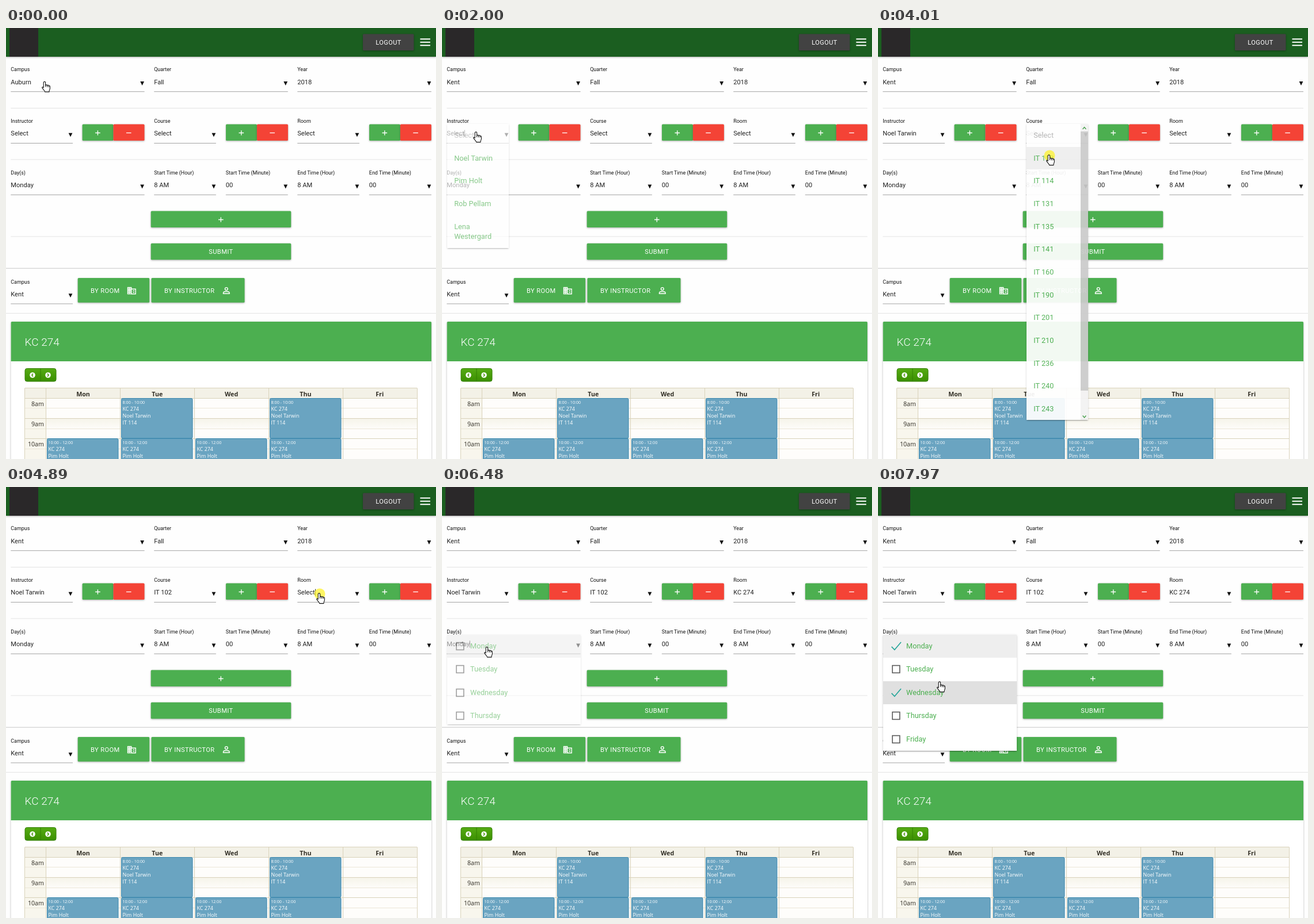
An HTML page that plays this animation: 747 px wide and 750 px high, repeating every 8000 ms.

```html
<!DOCTYPE html>
<html lang="en">
<head>
<meta charset="utf-8">
<title>Class schedule form</title>
<style>
html, body { margin: 0; width: 100%; height: 100%; overflow: hidden; background: #fefefe; }
body { position: relative; font-family: Roboto, sans-serif; }
svg { position: absolute; left: 0; top: 0; display: block; }
.btn { filter: drop-shadow(0 1.4px 1.6px rgba(0,0,0,.32)); }
.cal { font-family: "Open Sans", "Noto Sans", sans-serif; }
.list { position: absolute; overflow: hidden; background: #fff;
  box-shadow: 0 1.6px 1.6px rgba(0,0,0,.14), 0 1px 4px rgba(0,0,0,.14), 0 2.4px 1px -1.6px rgba(0,0,0,.2); }
.row { box-sizing: border-box; position: relative; padding: 11.1px 12.7px; white-space: pre;
  font-size: 12.69px; line-height: 17.45px; color: #4caf50; }
.bar { position: absolute; right: 0; top: 0; }
</style>
</head>
<body>
<svg id="page" width="747" height="750" viewBox="0 0 747 750"></svg>
<div id="lists"></div>
<svg id="top" width="747" height="750" viewBox="0 0 747 750">
  <circle id="spot" r="9.5" fill="#fdf22f" opacity=".75"/>
  <path id="hand" fill="#fff" stroke="#111" stroke-width="1.1" stroke-linejoin="round"
    d="M-1.8 1.6a1.7 1.7 0 0 1 3.4 0V6.4a1.5 1.5 0 0 1 2.9.3a1.4 1.4 0 0 1 2.7.5a1.3 1.3 0 0 1 2.2.8V11.5c0 2.2-1.4 3-1.4 5V17.6H.6c0-2.2-3.5-4.3-4.8-7c-.5-1.3 1-2.1 2.4-.2zM1.6 6.2V9M4.5 6.8V9.3M7.2 7.4V9.6"/>
</svg>
<script>
const GREEN = '#4caf50', RED = '#f44336', LOOP = 8000;
const $ = id => document.getElementById(id);
const rect = (x, y, w, h, fill, more = '') =>
  `<rect x="${x}" y="${y}" width="${w}" height="${h}" fill="${fill}" ${more}/>`;
const text = (x, y, s, size = 11.1, fill = '#222', more = '') =>
  `<text x="${x}" y="${y}" font-size="${size}" fill="${fill}" ${more}>${s}</text>`;
const path = (d, stroke, width = 1, more = '') =>
  `<path d="${d}" fill="none" stroke="${stroke}" stroke-width="${width}" ${more}/>`;
const mid = 'text-anchor="middle"';
const caps = 'letter-spacing=".4"';
const button = (x, y, w, h, fill) => rect(x, y, w, h, fill, 'rx="1.6" class="btn"');
const sign = (x, y, plus) =>
  path(`M${x - 4.3} ${y}h8.6${plus ? `M${x} ${y - 4.3}v8.6` : ''}`, '#fff', 1.3);

// x, width, label baseline, label, value
const fields = [
  [8.3, 232.3, 75.3, 'Campus', 'Auburn'],
  [8.3, 107.7, 165, 'Instructor', 'Select'],
  [257.2, 107.7, 165, 'Course', 'Select'],
  [506.2, 107.7, 165, 'Room', 'Select'],
  [8.3, 232.3, 254.8, 'Day(s)', 'Monday'],
  [257.2, 232.5, 75.3, 'Quarter', 'Fall'],
  [506.2, 232.8, 75.3, 'Year', '2018'],
  [257.2, 107.7, 254.8, 'Start Time (Hour)', '8 AM'],
  [381.8, 107.9, 254.8, 'Start Time (Minute)', '00'],
  [506.2, 107.7, 254.8, 'End Time (Hour)', '8 AM'],
  [630.8, 108.2, 254.8, 'End Time (Minute)', '00'],
  [8.3, 107.7, 444.5, 'Campus', 'Kent']
];

function field([x, w, y, label, value]) {
  const r = x + w;
  return text(x, y, label, 8.95, '#111') + text(x, y + 22.4, value, 11.1, '#222', 'class="value"') +
    rect(x, y + 35, w, 0.9, '#999') +
    `<path d="M${r - 7.4} ${y + 17.8}h6.8l-3.4 6.8z" fill="#111"/>`;
}

function calendarEvent(x, y, h, lines) {
  return rect(x, y, 123.5, h, '#6aa4c1', 'rx="2" stroke="#3a87ad"') +
    lines.map((s, i) => text(x + 2, y + (i ? 9.2 + 12.2 * i : 9.2), s, i ? 8.9 : 7.2, '#fff')).join('');
}

function calendar() {
  const cols = [69.5, 198.5, 327.5, 456.5, 585.5, 714.5];
  let s = rect(33, 627, 681.5, 123, '#fefdfb') + rect(33, 627, 36.5, 123, '#f8f6ed') +
    rect(33, 627, 681.5, 17, '#f3f1e7') + rect(70, 680, 644, 17, 'url(#cream)');
  s += path('M33 661.5H714M33 697.5H714M33 732.5H714', '#ece7d8', 1);
  s += path('M32.5 627V750' + cols.map(x => `M${x} 627V750`).join('') +
    'M32.5 626.5H714.5M32.5 644.5H714.5M32.5 679.5H714.5M32.5 714.5H714.5', '#d9d2ba');
  ['Mon', 'Tue', 'Wed', 'Thu', 'Fri'].forEach((d, i) =>
    s += text(134 + 128.8 * i, 640.5, d, 10.7, '#312e25', mid + ' font-weight="700"'));
  ['8am', '9am', '10am'].forEach((h, i) =>
    s += text(66, 658 + 35 * i, h, 10.7, '#312e25', 'text-anchor="end"'));
  [200.5, 458.5].forEach(x => s += calendarEvent(x, 644.5, 69.5, ['8:00 - 10:00', 'KC 274', 'Noel Tarwin', 'IT 114']));
  [71.5, 200.5, 329.5, 458.5].forEach(x => s += calendarEvent(x, 714.5, 70, ['10:00 - 12:00', 'KC 274', 'Pim Holt']));
  return `<g class="cal">${s}</g>`;
}

function arrowButton(x, dir) {
  return `<circle cx="${x}" cy="604" r="4.8" fill="#fff"/>` +
    path(`M${x + dir} 601.6l${-2 * dir} 2.4l${2 * dir} 2.4`, '#3f9400', 1.5);
}

function drawPage() {
  let s = `<defs>
    <linearGradient id="cream" x2="0" y2="1"><stop stop-color="#f6f4ea"/><stop offset="1" stop-color="#fdfcf9"/></linearGradient>
    <linearGradient id="nav" x2="0" y2="1"><stop stop-color="#55ab14"/><stop offset="1" stop-color="#3b8f00"/></linearGradient>
  </defs>`;
  s += rect(0, 0, 747, 50, '#1b5e20', 'class="btn"') + rect(6, 0, 50, 50, '#2a2829');
  s += button(620, 10.5, 88.5, 28.5, '#424242') + text(664.5, 28.7, 'LOGOUT', 11.1, '#fff', mid + ' ' + caps);
  s += path('M719.5 19.2h17.5M719.5 24.7h17.5M719.5 30.2h17.5', '#fff', 2);
  [139, 228.5, 362.5].forEach(y => s += rect(8.3, y, 730.7, 0.9, '#e0e0e0'));
  s += rect(0, 417.6, 747, 1.2, '#cfcfcf') + rect(0, 496, 747, 1, '#e4e4e4');
  s += fields.map(field).join('');
  [132.6, 382, 631].forEach(x => {
    s += button(x, 167.6, 53.9, 28.5, GREEN) + button(x + 53.9, 167.6, 54, 28.5, RED);
    s += sign(x + 26.8, 182.5, true) + sign(x + 80.6, 182.5, false);
  });
  s += button(251.7, 318.5, 243.5, 28.5, GREEN) + sign(373.3, 333.5, true);
  s += button(251.7, 374.8, 243.5, 28.5, GREEN) + text(373.4, 393, 'SUBMIT', 11.1, '#fff', mid + ' ' + caps);
  s += button(124.7, 435, 124.5, 42.8, GREEN) + text(147, 460.5, 'BY ROOM', 11.1, '#fff', caps);
  s += button(252.5, 435, 162, 42.8, GREEN) + text(275, 460.5, 'BY INSTRUCTOR', 11.1, '#fff', caps);
  s += rect(210.8, 450.8, 7.6, 12.6, '#fff') + path('M218 454.2h7.2v8.5h-7.2', '#fff', 1.4) +
    path('M212.4 453.2h4.6M212.4 456h4.6M212.4 458.8h4.6M212.4 461.6h4.6', GREEN, 1.2, 'stroke-dasharray="1.5 1.5"') +
    path('M220.5 457h2.6M220.5 460h2.6', '#fff', 1.4);
  s += '<circle cx="382.8" cy="454" r="2.4" fill="none" stroke="#fff" stroke-width="1.4"/>' +
    path('M377.5 462.3v-1.3c0-1.7 3.2-2.5 5.3-2.5s5.3.8 5.3 2.5v1.3z', '#fff', 1.4);
  s += rect(8.7, 511, 730.3, 260, '#fff', 'rx="1.6" class="btn"') +
    `<path d="M8.7 580V512.6q0-1.6 1.6-1.6H737.4q1.6 0 1.6 1.6V580z" fill="${GREEN}"/>`;
  s += text(32.5, 552.5, 'KC 274', 19, '#fff', 'font-weight="300"');
  s += rect(33, 592.5, 54, 22.5, 'url(#nav)', 'rx="3.5" stroke="#327e04"') + path('M60 593v22', '#327e04');
  s += arrowButton(46, 1) + arrowButton(73, -1) + calendar();
  s += '<rect id="caret" width="1" height="12" fill="#222"/>';
  $('page').innerHTML = s;
}

// One entry per drop-down: opening and closing times, rows, caret place
const lists = [
  { f: 0, y: 77, open: 710, close: 1215, caret: 43.5, pick: 'Kent', rows: ['Auburn', 'Kent'] },
  { f: 1, y: 167, open: 1862, close: 2420, caret: 38.8, pick: 'Noel Tarwin',
    rows: ['Select', 'Noel Tarwin', 'Pim Holt', 'Rob Pellam', 'Lena\nWestergard', 'Vic Sorrel'] },
  { f: 2, y: 167, open: 3450, close: 3995, caret: 288, pick: 'IT 102', scroll: true,
    rows: ['Select', ...[102, 114, 131, 135, 141, 160, 190, 201, 210, 236, 240, 243].map(n => 'IT ' + n)] },
  { f: 3, y: 167, open: 4940, close: 5680, caret: 537, pick: 'KC 274',
    rows: ['Select', ...[274, 275, 276, 277, 278, 279, 280].map(n => 'KC ' + n)] },
  { f: 4, y: 257, open: 6364, close: 9999, caret: 47.8, days: true,
    rows: ['Monday', 'Tuesday', 'Wednesday', 'Thursday', 'Friday'] }
];
const checked = { 0: 6980, 2: 7600 };

function buildList(l) {
  const [x, w] = fields[l.f], box = document.createElement('div');
  box.className = 'list';
  box.style.cssText = `left:${x + .3}px;top:${l.y}px;width:${w}px`;
  l.tops = [0];
  l.rows.forEach((s, i) => {
    const h = l.days ? 40.4 : s.includes('\n') ? 57.1 : 39.65;
    l.tops.push(l.tops[i] + h);
    const row = document.createElement('div');
    row.className = 'row';
    row.style.height = h + 'px';
    row.textContent = s;
    if (s === 'Select') row.style.color = '#b3b3b3';
    if (l.days) {
      row.style.paddingLeft = '40.5px';
      row.insertAdjacentHTML('beforeend', `<svg width="38" height="40">` +
        `<rect x="16" y="13.6" width="12.8" height="12.8" fill="none" stroke="#5a5a5a" stroke-width="1.6"/>` +
        path('M14.6 20.8l5.2 5.5L31 13', '#26a69a', 1.7, 'pathLength="1" stroke-dasharray="1 2"') + '</svg>');
    }
    box.append(row);
  });
  l.h = l.tops[l.rows.length];
  l.rowEls = [...box.children];
  if (l.scroll) box.insertAdjacentHTML('beforeend',
    `<svg class="bar" style="left:auto" width="13" height="${l.h}">` + rect(0, 0, 13, l.h, '#f3f3f3') + rect(0, 13, 13, 451, '#cbcbcb') +
    path('M3.6 9l2.9-3.4L9.4 9M3.6 507.5l2.9 3.4l2.9-3.4', '#3d9941', 1.4) + '</svg>');
  l.box = box;
  $('lists').append(box);
}

// Pointer stops: time, x, y
const stops = [
  [0, 67, 93.5], [1000, 67, 93.5], [1160, 60, 131], [1400, 60, 131], [1760, 59, 181],
  [2130, 59, 181], [2290, 56, 222], [2500, 56, 222], [3250, 310, 179], [3560, 310, 179],
  [3800, 297, 221], [4080, 297, 221], [4760, 542, 185], [4850, 544, 185], [5240, 544, 185],
  [5560, 538, 221], [5770, 538, 221], [6270, 78, 278.5], [7040, 78, 278.5], [7470, 107, 339], [8000, 107, 339]
];
// Presses: start, end
const presses = [[640, 760], [1165, 1280], [1770, 1890], [2370, 2480], [3350, 3480], [3960, 4070],
  [4830, 4960], [5630, 5740], [6280, 6400], [6890, 7010], [7510, 7660]];

const clamp = p => Math.max(0, Math.min(1, p));
const smooth = p => p * p * (3 - 2 * p);

function pointer(t) {
  const i = Math.max(1, stops.findIndex(s => s[0] > t));
  const [t0, x0, y0] = stops[i - 1], [t1, x1, y1] = stops[i];
  const p = smooth(clamp((t - t0) / (t1 - t0)));
  return [x0 + (x1 - x0) * p, y0 + (y1 - y0) * p];
}

function drawList(l, t, y) {
  const p = clamp((t - l.open) / 300), out = clamp((t - l.close) / 225);
  l.box.style.display = p > 0 && out < 1 ? '' : 'none';
  l.box.style.opacity = Math.sin(p * Math.PI / 2) * (1 - out);
  l.box.style.height = l.h * (1 - (1 - p) ** 3) + 'px';
  l.rowEls.forEach((row, i) => {
    const over = y >= l.y + l.tops[i] && y < l.y + l.tops[i + 1] && l.rows[i] !== 'Select';
    const on = l.days && t >= checked[i];
    row.style.background = on && over ? '#e0e0e0' : on || over ? '#eee' : '';
    if (!l.days) return;
    const k = on ? clamp((t - checked[i]) / 220) : 0;
    row.querySelector('rect').style.opacity = 1 - clamp(k * 2);
    const tick = row.querySelector('path');
    tick.style.opacity = k > 0 ? 1 : 0;
    tick.setAttribute('stroke-dasharray', k + ' 2');
  });
  if (l.pick) values[l.f].textContent = t >= l.close + 70 ? l.pick : fields[l.f][4];
}

function draw(t) {
  const [x, y] = pointer(t);
  $('hand').setAttribute('transform', `translate(${x} ${y})`);
  $('spot').setAttribute('transform', `translate(${x + 1} ${y + 1})`);
  $('spot').style.display = presses.some(([a, b]) => t >= a && t < b) ? '' : 'none';
  lists.forEach(l => drawList(l, t, y));
  const active = lists.find(l => t >= l.open - 100 && t < l.close);
  $('caret').style.display = active ? '' : 'none';
  if (active) {
    $('caret').setAttribute('x', active.caret);
    $('caret').setAttribute('y', fields[active.f][2] + 12.6);
  }
}

drawPage();
lists.forEach(buildList);
const values = document.querySelectorAll('.value');
function tick() {
  draw(performance.now() % LOOP);
  requestAnimationFrame(tick);
}
tick();
</script>
</body>
</html>
```
